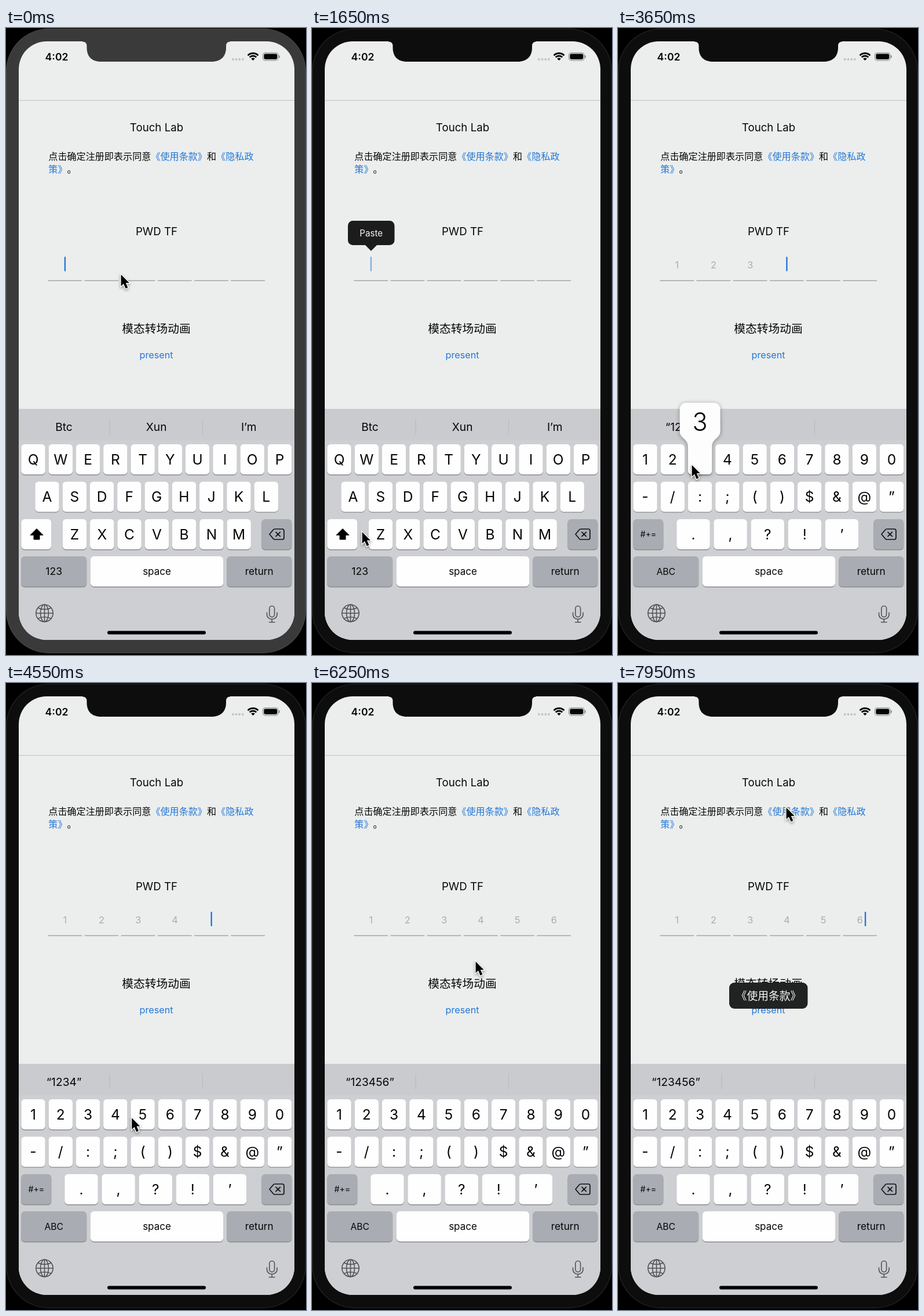
These frames come from a looping animation (518x1080 px, 8 s). An HTML page with a canvas:

```html
<!DOCTYPE html>
<html lang="zh-CN">
<head>
<meta charset="utf-8">
<title>PWD TF</title>
<style>
html, body { margin: 0; width: 100%; height: 100%; overflow: hidden; background: #000; }
canvas { display: block; width: 518px; height: 1080px; }
</style>
</head>
<body>
<canvas id="stage" width="518" height="1080"></canvas>
<script>
const ctx = document.getElementById('stage').getContext('2d');
const LOOP = 8000, TAU = Math.PI * 2;
const LATIN = 'Inter, "Noto Sans CJK SC", sans-serif';
const HAN = '"Noto Sans CJK SC", "Noto Sans CJK", sans-serif';
const BLUE = '#2277d8', BG = '#eceeed', GREY_KEY = '#a9acb2';

const SWITCH = 1850, PASTE_ON = 1200, TOAST_ON = 7500;
const TYPED = [2850, 3250, 3630, 4230, 4800, 5380];
const POINTER = [
  [0, 198, 424], [100, 198, 424], [550, 108, 412], [1300, 108, 412],
  [1750, 83, 932], [1950, 83, 932], [2500, 43, 754], [2900, 43, 754],
  [3100, 86, 753], [3300, 86, 753], [3520, 127, 752], [3750, 127, 752],
  [4080, 178, 750], [4300, 178, 750], [4650, 226, 748], [4880, 226, 748],
  [5200, 274, 745], [5600, 274, 745], [6900, 290, 214], [8000, 290, 214]
];

const clamp = v => Math.max(0, Math.min(1, v));
const ease = v => v * v * (3 - 2 * v);
const colX = i => 47 + i * 47.28;
const cellX = i => 101.8 + i * 63.2;

function box(x, y, w, h, r, fill) {
  ctx.beginPath();
  ctx.roundRect(x, y, w, h, r);
  ctx.fillStyle = fill;
  ctx.fill();
}

function line(points, close) {
  ctx.beginPath();
  points.forEach(([x, y]) => ctx.lineTo(x, y));
  if (close) ctx.closePath();
}

// y is the middle of the capital letters
function text(str, x, y, size, { color = '#050505', weight = 400, font = LATIN, align = 'center' } = {}) {
  ctx.font = `${weight} ${size}px ${font}`;
  ctx.textAlign = align;
  ctx.fillStyle = color;
  ctx.fillText(str, x, y + size * (font === HAN ? 0.38 : 0.364));
}

function key(cx, y, w, label, size = 24.5, fill = '#fefefe') {
  box(cx - w / 2, y + 1.4, w, 52, 6, '#898b8f');
  box(cx - w / 2, y, w, 52, 6, fill);
  if (label) text(label, cx, y + 26, size);
}

function drawBody(t) {
  const shell = t < 50 ? '#3a3a3a' : '#0d0d0d';
  ctx.fillStyle = '#000';
  ctx.fillRect(0, 0, 518, 1080);
  box(0, 1, 518, 1076, 74, t < 50 ? '#464646' : '#252525');
  box(1.2, 2.2, 515.6, 1073.6, 73, shell);
  return shell;
}

function drawNotch(shell) {
  ctx.beginPath();
  ctx.moveTo(132, 22);
  ctx.lineTo(132, 23.5);
  ctx.quadraticCurveTo(139.5, 23.5, 139.5, 31);
  ctx.lineTo(139.5, 34);
  ctx.bezierCurveTo(139.5, 49, 148, 58, 164, 58);
  ctx.lineTo(355, 58);
  ctx.bezierCurveTo(371, 58, 380, 49, 380, 34);
  ctx.lineTo(380, 31);
  ctx.quadraticCurveTo(380, 23.5, 387, 23.5);
  ctx.lineTo(387, 22);
  ctx.closePath();
  ctx.fillStyle = shell;
  ctx.fill();
}

function drawStatus() {
  text('4:02', 87.5, 49.5, 17.6, { weight: 600 });
  for (let i = 0; i < 4; i++) {
    box(389.8 + i * 5.7, 52, 4, 4, 2, '#c2c4c4');
  }
  ctx.save();
  ctx.beginPath();
  ctx.moveTo(426.5, 56);
  ctx.arc(426.5, 56, 15, -Math.PI * 0.755, -Math.PI * 0.245);
  ctx.clip();
  ctx.strokeStyle = ctx.fillStyle = '#050505';
  ctx.lineWidth = 2.8;
  for (const r of [12.5, 8]) {
    ctx.beginPath();
    ctx.arc(426.5, 56, r, Math.PI, TAU);
    ctx.stroke();
  }
  ctx.beginPath();
  ctx.arc(426.5, 56, 4.6, 0, TAU);
  ctx.fill();
  ctx.restore();

  ctx.beginPath();
  ctx.roundRect(443.5, 42.8, 26.5, 13, 4);
  ctx.strokeStyle = '#8c8e8e';
  ctx.lineWidth = 1.2;
  ctx.stroke();
  box(445.3, 44.6, 23, 9.4, 2.4, '#050505');
  box(471, 47, 1.8, 4.6, 1, '#8c8e8e');
}

function caretAlpha(t, typed) {
  const start = typed ? TYPED[typed - 1] + 120 : t < 1120 ? -450 : 1120;
  if (t < start) return 1;
  const p = (t - start) % 1000 / 1000;
  return p < 0.8 ? clamp((0.61 - p) / 0.15) : clamp((p - 0.8) / 0.18);
}

function drawPage(t, typed) {
  ctx.fillStyle = '#c9cbcb';
  ctx.fillRect(22, 124, 476, 1.3);
  text('Touch Lab', 260, 171, 18.7);

  const han = { font: HAN, align: 'left' }, link = { ...han, color: BLUE };
  const em = 16.1, left = 73.3;
  text('点击确定注册即表示同意', left, 220.5, em, han);
  text('《使用条款》', left + 11 * em, 220.5, em, link);
  text('和', left + 17 * em, 220.5, em, han);
  text('《隐私政', left + 18 * em, 220.5, em, link);
  text('策》', left, 243.3, em, link);
  text('。', left + 2 * em, 243.3, em, han);

  text('PWD TF', 260, 350, 18.7);
  for (let i = 0; i < 6; i++) {
    ctx.fillStyle = '#a9abaa';
    ctx.fillRect(cellX(i) - 29.5, 434.4, 58.8, 1.6);
    if (i < typed) text(String(i + 1), cellX(i), 407.7, 16.3, { color: '#aaacac' });
  }
  ctx.globalAlpha = caretAlpha(t, typed);
  box(typed < 6 ? cellX(typed) - 1.1 : 425.9, 394, 2.4, 25, 1, BLUE);
  ctx.globalAlpha = 1;

  text('模态转场动画', 259.5, 517, 19.8, { font: HAN });
  text('present', 259.5, 563, 16.2, { color: BLUE });
}

function drawPaste(t) {
  if (t < PASTE_ON || t >= TYPED[0]) return;
  ctx.globalAlpha = clamp((t - PASTE_ON) / 150);
  box(62, 332, 80.5, 42, 8.5, '#1c1c1c');
  line([[91, 373], [113, 373], [102, 384]], true);
  ctx.fill();
  text('Paste', 102.2, 353, 15.2, { color: '#f4f4f4' });
  ctx.globalAlpha = 1;
}

function drawToast(t) {
  if (t < TOAST_ON) return;
  ctx.globalAlpha = clamp((t - TOAST_ON) / 200);
  box(192, 516, 135.5, 45, 9, '#212222');
  text('《使用条款》', 260, 538.8, 18.8, { color: '#f6f6f6', font: HAN });
  ctx.globalAlpha = 1;
}

function drawSuggestions(t, typed) {
  ctx.fillStyle = '#bbbcc0';
  ctx.fillRect(178.4, 673, 1.2, 27);
  ctx.fillRect(339, 673, 1.2, 27);
  if (!typed) {
    ['Btc', 'Xun', 'I’m'].forEach((s, i) => text(s, 100 + i * 159.6, 687, 19.2));
    return;
  }
  const shown = TYPED.filter(at => t >= at + 150).length;
  if (shown) text('“' + '123456'.slice(0, shown) + '”', 100, 687, 19.2);
}

function drawDelete() {
  ctx.strokeStyle = '#111';
  ctx.lineWidth = 1.7;
  ctx.lineJoin = ctx.lineCap = 'round';
  ctx.beginPath();
  ctx.moveTo(455, 872);
  ctx.lineTo(461.5, 864.3);
  ctx.quadraticCurveTo(462.5, 863, 464.5, 863);
  ctx.lineTo(477, 863);
  ctx.quadraticCurveTo(480, 863, 480, 866);
  ctx.lineTo(480, 878);
  ctx.quadraticCurveTo(480, 881, 477, 881);
  ctx.lineTo(464.5, 881);
  ctx.quadraticCurveTo(462.5, 881, 461.5, 879.7);
  ctx.closePath();
  ctx.moveTo(466, 868.3);
  ctx.lineTo(473.4, 875.7);
  ctx.moveTo(473.4, 868.3);
  ctx.lineTo(466, 875.7);
  ctx.stroke();
}

function drawShift() {
  line([[53, 862.5], [64, 873.5], [58, 873.5], [58, 881], [48, 881], [48, 873.5], [42, 873.5]], true);
  ctx.fillStyle = ctx.strokeStyle = '#000';
  ctx.lineJoin = 'round';
  ctx.lineWidth = 1;
  ctx.fill();
  ctx.stroke();
}

function drawGlobeAndMic() {
  ctx.strokeStyle = '#505256';
  ctx.lineWidth = 1.6;
  ctx.lineCap = 'round';
  const cx = 66.5, cy = 1008;
  for (const rx of [14.7, 7]) {
    ctx.beginPath();
    ctx.ellipse(cx, cy, rx, 14.7, 0, 0, TAU);
    ctx.stroke();
  }
  ctx.beginPath();
  ctx.moveTo(cx, cy - 14.7);
  ctx.lineTo(cx, cy + 14.7);
  ctx.moveTo(cx - 14.7, cy);
  ctx.lineTo(cx + 14.7, cy);
  ctx.moveTo(cx - 11, cy - 9);
  ctx.quadraticCurveTo(cx, cy - 4, cx + 11, cy - 9);
  ctx.moveTo(cx - 11, cy + 9);
  ctx.quadraticCurveTo(cx, cy + 4, cx + 11, cy + 9);
  ctx.stroke();

  ctx.beginPath();
  ctx.roundRect(454.8, 995.5, 8.8, 19, 4.4);
  ctx.moveTo(450.5, 1007);
  ctx.lineTo(450.5, 1010);
  ctx.bezierCurveTo(450.5, 1021, 468, 1021, 468, 1010);
  ctx.lineTo(468, 1007);
  ctx.moveTo(459.2, 1018.5);
  ctx.lineTo(459.2, 1023.5);
  ctx.moveTo(454.5, 1023.5);
  ctx.lineTo(464, 1023.5);
  ctx.stroke();
}

function drawKeyboard(t, typed) {
  ctx.fillStyle = '#cecfd2';
  ctx.fillRect(22, 656, 476, 400);
  ctx.fillStyle = '#cacbce';
  ctx.fillRect(22, 656, 476, 54);
  drawSuggestions(t, typed);

  const numeric = t >= SWITCH;
  const row = (keys, first, y) => [...keys].forEach((k, i) => key(colX(i) + first, y, 41.4, k));
  if (numeric) {
    row('1234567890', 0, 717);
    row('-/:;()$&@”', 0, 781.4);
    [...'.,?!’'].forEach((k, i) => key(130 + i * 64.1, 846, 57.5, k));
    key(52.3, 846, 52, '#+=', 14.2, GREY_KEY);
    key(82.7, 910, 113, 'ABC', 15.7, GREY_KEY);
  } else {
    row('QWERTYUIOP', 0, 717);
    row('ASDFGHJKL', 24, 781.4);
    row('ZXCVBNM', 71.5, 846);
    key(52.3, 846, 52);
    drawShift();
    key(82.7, 910, 113, '123', 17.6, GREY_KEY);
  }
  key(467.3, 846, 52, '', 0, GREY_KEY);
  drawDelete();
  key(260.5, 910, 229, 'space', 17);
  key(437.3, 910, 112, 'return', 17.2, GREY_KEY);
  drawGlobeAndMic();
  box(175, 1038.5, 170, 6, 3, '#000');
}

function drawPopup(t) {
  const i = TYPED.findIndex(at => t >= at - 130 && t < at + 100);
  if (i < 0) return;
  const cx = colX(i), kl = cx - 20.7, kr = cx + 20.7;
  const l = Math.max(24, cx - 35), r = l + 70, top = 645.5, r0 = 11;
  ctx.save();
  ctx.beginPath();
  ctx.moveTo(l + r0, top);
  ctx.arcTo(r, top, r, 700, r0);
  ctx.lineTo(r, 694);
  ctx.bezierCurveTo(r, 708, kr, 706, kr, 722);
  ctx.lineTo(kr, 763);
  ctx.arcTo(kr, 769, kr - 6, 769, 6);
  ctx.lineTo(kl + 6, 769);
  ctx.arcTo(kl, 769, kl, 763, 6);
  ctx.lineTo(kl, 722);
  ctx.bezierCurveTo(kl, 706, l, 708, l, 694);
  ctx.lineTo(l, top + r0);
  ctx.arcTo(l, top, l + r0, top, r0);
  ctx.closePath();
  ctx.shadowColor = 'rgba(0,0,0,.35)';
  ctx.shadowBlur = 7;
  ctx.shadowOffsetY = 1;
  ctx.fillStyle = '#fdfdfd';
  ctx.fill();
  ctx.restore();
  text(String(i + 1), (l + r) / 2, 678, 43, { weight: 300 });
}

function drawPointer(t) {
  const n = POINTER.findIndex(p => p[0] > t);
  const [t0, x0, y0] = POINTER[n - 1], [t1, x1, y1] = POINTER[n];
  const k = ease((t - t0) / (t1 - t0));
  ctx.save();
  ctx.translate(x0 + (x1 - x0) * k, y0 + (y1 - y0) * k);
  line([[0.6, 0.8], [0.6, 20.5], [5, 16.4], [8.6, 24.8], [12.4, 23.2], [8.8, 15], [14.8, 15]], true);
  ctx.lineJoin = 'miter';
  ctx.lineWidth = 2.6;
  ctx.strokeStyle = '#fff';
  ctx.shadowColor = 'rgba(0,0,0,.4)';
  ctx.shadowBlur = 4;
  ctx.shadowOffsetY = 2;
  ctx.stroke();
  ctx.shadowColor = 'transparent';
  ctx.fillStyle = '#000';
  ctx.fill();
  ctx.restore();
}

function draw(now) {
  const t = now % LOOP;
  const typed = TYPED.filter(at => t >= at).length;
  const shell = drawBody(t);
  ctx.save();
  ctx.beginPath();
  ctx.roundRect(22, 23, 476, 1031, 48);
  ctx.clip();
  ctx.fillStyle = BG;
  ctx.fillRect(22, 23, 476, 1031);
  drawPage(t, typed);
  drawPaste(t);
  drawToast(t);
  drawKeyboard(t, typed);
  drawPopup(t);
  ctx.restore();
  drawNotch(shell);
  drawStatus();
  drawPointer(t);
}

const begin = performance.now();
function tick() {
  draw(performance.now() - begin);
  requestAnimationFrame(tick);
}
tick();
</script>
</body>
</html>
```
